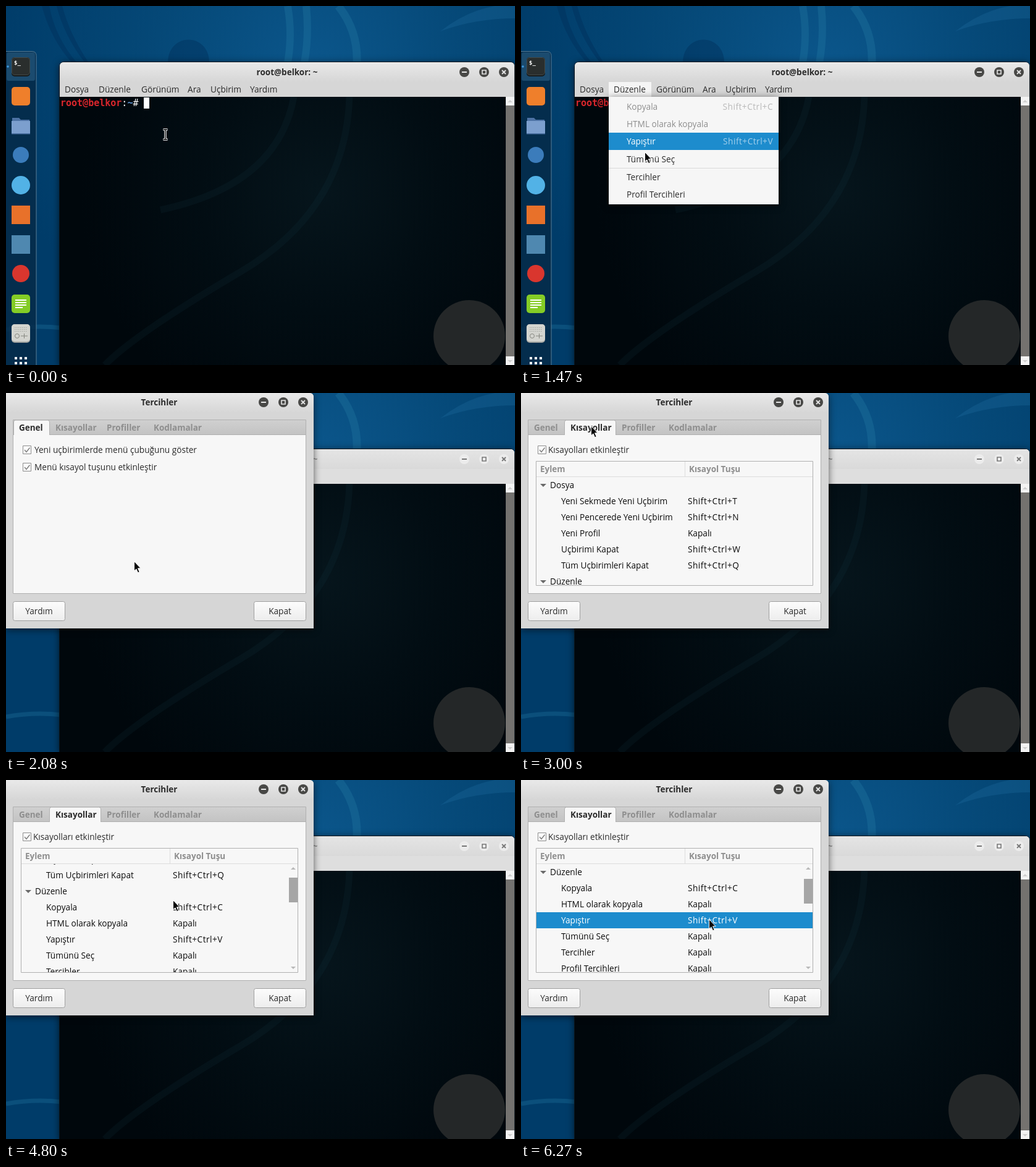
These frames come from a looping animation (824x581 px, 6590 ms). An HTML page:

```html
<!DOCTYPE html>
<html lang="tr">
<head>
<meta charset="utf-8">
<title>Uçbirim tercihleri</title>
<style>
html, body { margin: 0; width: 100%; height: 100%; overflow: hidden; background: #003c69; }
svg { display: block; width: 824px; height: 581px; }
text { font: 13.65px "Open Sans", "Noto Sans", sans-serif; fill: #2b2b2b; white-space: pre; }
.bold { font-size: 13.5px; font-weight: 700; }
.mid { text-anchor: middle; }
.end { text-anchor: end; }
.combo { letter-spacing: .5px; }
.gray { fill: #8e8e8e; }
.pale { fill: #b9b9b9; }
.mono { font: 15px "DejaVu Sans Mono", monospace; fill: #fff; }
.list text { fill: #0c0c0c; }
.picked rect { fill: #1d8ccd; }
.picked text, .list .picked text { fill: #fff; }
.picked .pale { fill: #a5d0ec; }
.line { fill: none; stroke: #b0b0b0; }
.shadow { filter: drop-shadow(0 2px 6px rgba(0, 0, 0, .6)); }
.dark { color: #484846; fill: #e6e6e6; stroke: #e6e6e6; }
.light { color: #ececec; fill: #777; stroke: #777; }

.timed { opacity: 0; animation: 6.59s step-end infinite; }
.desk { animation-name: desk; }
.edit { animation-name: edit; }
.menu { animation-name: menu; }
.paste { animation-name: paste; }
.all { animation-name: all; }
.prefs { animation-name: prefs; }
.dialog { animation-name: dialog; }
.general { animation-name: general; }
.keys { animation-name: keys; }
.bar { animation-name: bar; }
.first { animation-name: first; }
.second { animation-name: second; }
.beam { animation-name: beam; }
.arrow { animation-name: arrow; }
.scroll { animation: scroll 6.59s step-end infinite; }
.thumb { animation: thumb 6.59s step-end infinite; }
.pointer { animation: pointer 6.59s linear infinite; }

@keyframes desk { 0% { opacity: 1 } 31.55%, 100% { opacity: 0 } }
@keyframes edit { 14.1% { opacity: 1 } 31.55% { opacity: 0 } }
@keyframes menu { 14.1% { opacity: 1 } 30.34% { opacity: 0 } }
@keyframes paste { 22.29% { opacity: 1 } 23.47% { opacity: 0 } }
@keyframes all { 23.47% { opacity: 1 } 25.79% { opacity: 0 } }
@keyframes prefs { 25.79% { opacity: 1 } 30.34% { opacity: 0 } }
@keyframes dialog { 31.55%, 100% { opacity: 1 } }
@keyframes general { 31.55% { opacity: 1 } 45.51% { opacity: 0 } }
@keyframes keys { 45.51%, 100% { opacity: 1 } }
@keyframes bar { 56.29%, 100% { opacity: 1 } }
@keyframes first { 85.87% { opacity: 1 } 95.13% { opacity: 0 } }
@keyframes second { 95.13%, 100% { opacity: 1 } }
@keyframes beam { 0% { opacity: 1 } 8.08%, 100% { opacity: 0 } }
@keyframes arrow { 8.08%, 100% { opacity: 1 } }
@keyframes scroll {
  0% { transform: none }
  60.99% { transform: translateY(-31px) }
  67.06% { transform: translateY(-62px) }
  72.83% { transform: translateY(-125px) }
  76.32%, 100% { transform: translateY(-156px) }
}
@keyframes thumb {
  0% { transform: none }
  60.99% { transform: translateY(2px) }
  67.06% { transform: translateY(4px) }
  72.83% { transform: translateY(8px) }
  76.32%, 100% { transform: translateY(10px) }
}
@keyframes pointer {
  0% { transform: translate(258px, 208px) }
  2.27% { transform: translate(258px, 208px); animation-timing-function: steps(7, start) }
  10.42% { transform: translate(177px, 132px) }
  18.81% { transform: translate(177px, 132px); animation-timing-function: steps(4, start) }
  23.47% { transform: translate(200px, 236px); animation-timing-function: steps(3, start) }
  26.96% { transform: translate(207px, 272px) }
  37.32% { transform: translate(207px, 272px); animation-timing-function: steps(7, start) }
  45.51% { transform: translate(113px, 53px) }
  51.58% { transform: translate(113px, 53px); animation-timing-function: steps(8, start) }
  60.99% { transform: translate(270px, 194px) }
  79.81% { transform: translate(270px, 194px); animation-timing-function: steps(3, start) }
  83.3% { transform: translate(304px, 176px) }
  87.05% { transform: translate(304px, 176px); animation-timing-function: steps(7, start) }
  95.13%, 100% { transform: translate(304px, 225px) }
}
</style>
</head>
<body>
<svg viewBox="0 0 824 581">
  <defs>
    <radialGradient id="sky" gradientUnits="userSpaceOnUse" cx="500" cy="100" r="520">
      <stop offset="0" stop-color="#0b568b"/><stop offset=".5" stop-color="#054877"/><stop offset="1" stop-color="#003c69"/>
    </radialGradient>
    <radialGradient id="night" gradientUnits="userSpaceOnUse" cx="510" cy="300" r="390">
      <stop offset="0" stop-color="#06151c"/><stop offset=".5" stop-color="#020d13"/><stop offset="1" stop-color="#00070c"/>
    </radialGradient>
    <linearGradient id="head" x2="0" y2="1"><stop stop-color="#e9e9e9"/><stop offset="1" stop-color="#d6d6d6"/></linearGradient>
    <linearGradient id="btn" x2="0" y2="1"><stop stop-color="#fcfcfc"/><stop offset="1" stop-color="#ededed"/></linearGradient>
    <linearGradient id="strip" x2="0" y2="1"><stop stop-color="#d0d0d0"/><stop offset="1" stop-color="#c3c3c3"/></linearGradient>
    <clipPath id="body"><path d="M87 147h722v434H87z"/></clipPath>
    <clipPath id="view"><path d="M25 136h447v175H25z"/></clipPath>
    <g id="controls">
      <g fill="currentColor" stroke="none"><circle r="8"/><circle cx="32" r="8"/><circle cx="64" r="8"/></g>
      <path d="M-4 0h8M61 -3l6 6m0 -6l-6 6" stroke-width="1.8"/>
      <path d="M29 -3h6v6h-6z" fill="none" stroke-width="1.6"/>
    </g>
    <g id="check">
      <path class="line" d="M.5 .5h13v13H.5z" style="fill:#fcfcfc;stroke:#8c8c8c"/>
      <path d="M3 7l3 3.5 5.5 -7" fill="none" stroke="#858585" stroke-width="1.6"/>
    </g>
  </defs>

  <rect width="824" height="581" fill="url(#sky)"/>
  <g fill="none" stroke="#2a80aa" stroke-opacity=".28">
    <path d="M456 0q8 46 0 92M486 0q5 46 -3 92" stroke-width="12"/>
    <path d="M538 0q32 40 30 92" stroke-width="13"/>
    <path d="M0 524q45 -8 90 -3" stroke-width="7"/>
  </g>
  <g fill="#002f58" fill-opacity=".42">
    <path d="M262 92c0 -50 67 -50 67 0z"/>
    <path d="M58 0q15 55 49 92h8Q80 52 70 0zM82 0q12 48 46 92h6Q103 46 91 0z"/>
  </g>
  <path d="M703 41Q745 8 791 0h33v20Q760 20 703 41z" fill="#2474a6" fill-opacity=".25"/>

  <g class="shadow">
    <path d="M86 581V99q0 -9 9 -9h720q9 0 9 9v482z" fill="#0a141b"/>
  </g>
  <path d="M87 147V98q0 -7 7 -7h722q7 0 7 7v49z" fill="#d6d6d6"/>
  <path d="M87 123V98q0 -7 7 -7h722q7 0 7 7v25z" fill="url(#head)"/>
  <path d="M87 147h722v434H87z" fill="url(#night)"/>
  <g clip-path="url(#body)">
    <g fill="none" stroke="#163944" stroke-opacity=".16" stroke-width="11">
      <path d="M466 147Q440 290 250 330M556 147Q550 330 380 430T160 581"/>
    </g>
    <circle cx="750" cy="534" r="58" fill="#242728"/>
  </g>
  <path d="M809 147h14v434h-14z" fill="#74726f"/>
  <path d="M809 147h14v14h-14zM809 567h14v14h-14z" fill="#f3f3f3"/>
  <path d="M812 156l4 -4 4 4zM812 573l4 4 4 -4z" fill="#cfcfcf"/>
  <text class="mid bold" x="455" y="112">root@belkor: ~</text>
  <use href="#controls" x="742" y="107" class="dark"/>
  <path class="timed edit" d="M142 123h69v24h-69z" fill="#f5f5f5"/>
  <g id="menubar"></g>
  <text class="mono" x="88" y="162"><tspan font-weight="700" fill="#d9262c">root@belkor</tspan>:<tspan font-weight="700" fill="#5d93cf">~</tspan>#</text>
  <path d="M223 148h9v18h-9z" fill="#fff"/>

  <g class="timed desk">
    <path d="M-1 73.500H42q7 0 7 7V582H-1z" fill="#052a47" fill-opacity=".82" stroke="#587e98"/>
    <rect x="1" y="75" width="46" height="46" rx="3" fill="#4585ad" fill-opacity=".35"/>
    <circle cx="3" cy="98" r="1.800" fill="#3f9ade"/>
    <rect x="9" y="83" width="30" height="31" rx="5" fill="#171b1b"/>
    <rect x="9.500" y="83.500" width="29" height="28" rx="4.500" fill="#2a2e2d" stroke="#434846"/>
    <text class="mono" x="13" y="95" style="font-size:9px;font-weight:700">$_</text>
    <rect x="9" y="131" width="30" height="30" rx="5" fill="#ef7f2b"/>
    <path d="M10 181h11l3 3h14v5H10z" fill="#4d72a4"/>
    <path d="M9 186h30v21H9z" fill="#7c9fce"/>
    <path d="M9 206h30v1.500H9z" fill="#4d72a4"/>
    <circle cx="24" cy="241" r="13" fill="#3b7cbb"/>
    <circle cx="24" cy="290" r="15" fill="#52b2e6"/>
    <rect x="9" y="323" width="30" height="30" fill="#e8712a"/>
    <rect x="9" y="371" width="30" height="30" fill="#4f88b0"/>
    <circle cx="24" cy="433" r="14" fill="#d9362e"/>
    <rect x="9" y="467" width="30" height="30" rx="5" fill="#84cc26"/>
    <path d="M15 476h18M15 480h18M15 484h18M15 488h12" stroke="#fff" stroke-width="2"/>
    <rect x="9" y="515" width="30" height="30" rx="5" fill="#a5a6a2"/>
    <rect x="9" y="515" width="30" height="28" rx="5" fill="#d3d4cf"/>
    <path d="M14 520.500h21M14 523.500h21M14 526.500h21" stroke="#a5a6a1" stroke-dasharray="1.500 1.500"/>
    <g fill="none" stroke="#85867f"><circle cx="18" cy="534" r="3.500"/><path d="M24 534h11M29.500 530v8"/></g>
    <path d="M14 570h20M14 578h20" stroke="#f4f7f9" stroke-width="4" stroke-dasharray="4"/>
  </g>

  <g class="timed menu">
    <path class="shadow" d="M142 147h275v174H142z" fill="#f6f6f6"/>
    <path d="M142 262.500h275" class="line" style="stroke:#d9d9d9"/>
    <g id="menu"></g>
  </g>

  <g class="timed dialog">
    <path d="M87 147V98q0 -7 7 -7h722q7 0 7 7v49z" fill="#dedede"/>
    <path d="M87 123V98q0 -7 7 -7h722q7 0 7 7v25z" fill="url(#head)" opacity=".6"/>
    <text class="mid bold gray" x="455" y="112">root@belkor: ~</text>
    <use href="#controls" x="742" y="107" class="light"/>
    <path class="shadow" d="M0 0h491q7 0 7 7v374H0z" fill="#d6d6d6"/>
    <path d="M0 0h491q7 0 7 7v25H0z" fill="url(#head)"/>
    <text class="mid bold" x="248" y="20">Tercihler</text>
    <use href="#controls" x="417" y="15" class="dark"/>
    <path d="M11 43h475v25H11z" fill="url(#strip)"/>
    <path d="M11 68h475v257H11z" fill="#f7f7f7"/>
    <path class="line" d="M11.500 43.500h474v281h-474zM11.500 67.500h474"/>
    <g id="tabs"></g>
    <g id="buttons"></g>

    <g class="timed general">
      <path class="line" d="M12.500 68V47q0 -3 3 -3h52q3 0 3 3v21" style="fill:#f7f7f7"/>
      <text class="bold" x="21" y="61">Genel</text>
      <use href="#check" x="27" y="85"/>
      <text x="46" y="97">Yeni uçbirimlerde menü çubuğunu göster</text>
      <use href="#check" x="27" y="113"/>
      <text x="46" y="125">Menü kısayol tuşunu etkinleştir</text>
    </g>

    <g class="timed keys">
      <path class="line" d="M70.500 68V47q0 -3 3 -3h77q3 0 3 3v21" style="fill:#f7f7f7"/>
      <text class="bold" x="80" y="61">Kısayollar</text>
      <use href="#check" x="27" y="85"/>
      <text x="44" y="97">Kısayolları etkinleştir</text>
      <path class="line" d="M25 135.500h447M265.500 111v25" style="stroke:#dcdcdc"/>
      <text class="bold gray" x="31" y="128">Eylem</text>
      <text class="bold gray" x="272" y="128">Kısayol Tuşu</text>
      <g clip-path="url(#view)" class="list">
        <g id="list" class="scroll"></g>
        <g class="timed bar">
          <path d="M461 145l4 -4 4 4zM461 302l4 4 4 -4z" fill="#b9b9b9"/>
          <path class="thumb" d="M458 150h14v40h-14z" fill="#a6a6a6"/>
        </g>
      </g>
      <path class="line" d="M24.500 110.500h448v201h-448z"/>
    </g>
  </g>

  <g class="pointer">
    <g class="timed beam" fill="none">
      <path d="M-3.500 -8H3.500M-3.500 8H3.500M0 -8V8" stroke="#fff" stroke-width="3.500"/>
      <path d="M-3 -8H3M-3 8H3M0 -8V8" stroke="#000" stroke-width="1.300"/>
    </g>
    <path class="timed arrow" d="M.5 .5V16l3.400 -3.200 2.700 6 2.600 -1.200 -2.700 -5.800h4.700z" fill="#060606" stroke="#fff"/>
  </g>
</svg>
<script>
const fill = (id, parts) => document.getElementById(id).innerHTML = parts.join('');
const text = (x, y, s, cls = '') =>
  `<text x="${x}" y="${y}" class="${cls}${s.includes('+') ? ' combo' : ''}">${s}</text>`;

fill('menubar', [[95, 'Dosya'], [150, 'Düzenle'], [219, 'Görünüm'], [294, 'Ara'], [331, 'Uçbirim'], [395, 'Yardım']]
  .map(([x, s]) => text(x, 140, s)));

fill('tabs', [[21, 'Genel'], [80, 'Kısayollar'], [163, 'Profiller'], [239, 'Kodlamalar']]
  .map(([x, s]) => text(x, 61, s, 'bold gray')));

fill('buttons', [[11, 'Yardım'], [401, 'Kapat']].map(([x, s]) =>
  `<rect x="${x + .5}" y="337.5" width="84" height="31" rx="3" fill="url(#btn)" stroke="#a0a0a0"/>` +
  text(x + 42.5, 358, s, 'mid')));

const picked = (cls, x, y, w, h, inner) =>
  `<g class="timed picked ${cls}"><rect x="${x}" y="${y}" width="${w}" height="${h}"/>${inner}</g>`;

// Menu entries: top, label, shortcut, text class, hover class
fill('menu', [
  [149, 'Kopyala', 'Shift+Ctrl+C', 'gray'],
  [177, 'HTML olarak kopyala', '', 'gray'],
  [205, 'Yapıştır', 'Shift+Ctrl+V', '', 'paste'],
  [234, 'Tümünü Seç', '', '', 'all'],
  [263, 'Tercihler', '', '', 'prefs'],
  [291, 'Profil Tercihleri', '', '']
].map(([y, name, key, cls, hover]) => {
  const label = text(171, y + 19, name, cls) + text(408, y + 19, key, 'end pale');
  return label + (hover ? picked(hover, 142, y, 275, 28, label) : '');
}));

// List rows: label, shortcut, selection class; rows without a shortcut are groups
fill('list', [
  ['Dosya'],
  ['Yeni Sekmede Yeni Uçbirim', 'Shift+Ctrl+T'],
  ['Yeni Pencerede Yeni Uçbirim', 'Shift+Ctrl+N'],
  ['Yeni Profil', 'Kapalı'],
  ['Uçbirimi Kapat', 'Shift+Ctrl+W'],
  ['Tüm Uçbirimleri Kapat', 'Shift+Ctrl+Q'],
  ['Düzenle'],
  ['Kopyala', 'Shift+Ctrl+C', 'first'],
  ['HTML olarak kopyala', 'Kapalı'],
  ['Yapıştır', 'Shift+Ctrl+V', 'second'],
  ['Tümünü Seç', 'Kapalı'],
  ['Tercihler', 'Kapalı'],
  ['Profil Tercihleri', 'Kapalı']
].map(([name, key, sel], i) => {
  const y = 136 + 26 * i;
  if (!key) return `<path d="M31 ${y + 11}h10l-5 5z" fill="#6a6a6a"/>` + text(47, y + 18, name);
  const label = text(65, y + 18, name) + text(270, y + 18, key);
  return label + (sel ? picked(sel, 25, y, 447, 26, label) : '');
}));
</script>
</body>
</html>
```
